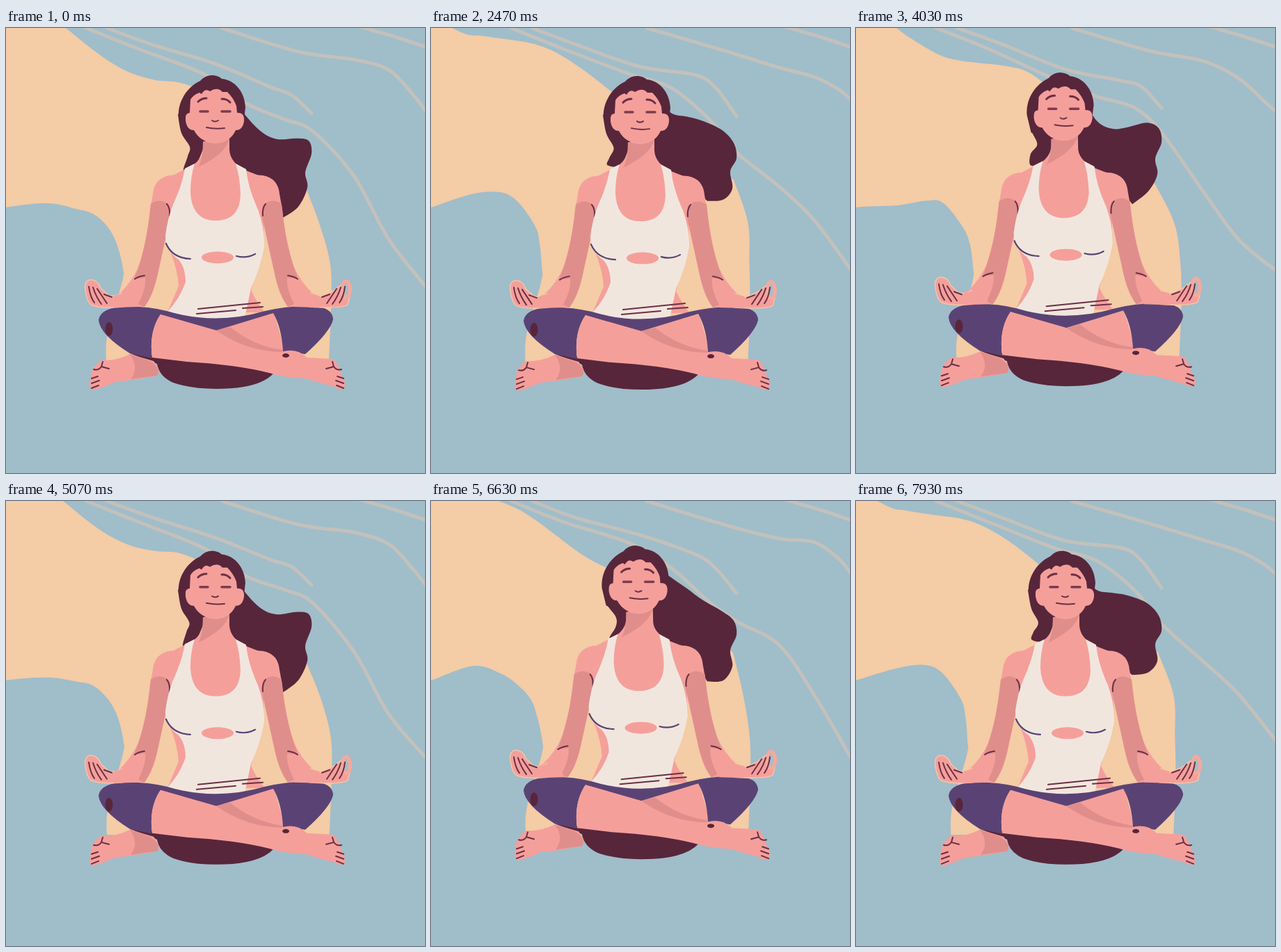
An HTML page for the animation above (8060 ms loop, 602 by 640 pixels).

```html
<!DOCTYPE html>
<html>
<head>
<meta charset="utf-8">
<style>
  html, body { margin: 0; width: 100%; height: 100%; overflow: hidden; background: #a0bdca; }
  svg { display: block; }
  .skin { fill: #f59f9b; }
  .shade { fill: #e08e8c; }
  .hair { fill: #57263b; }
  .cloth { fill: #f1e6de; }
  .shorts { fill: #5a4374; }
  .sand { fill: #f4cca5; }
  .wind { fill: none; stroke: #c3c1bb; stroke-width: 5; stroke-linecap: round; }
  .ink { fill: none; stroke: #6b3045; stroke-width: 2; stroke-linecap: round; }
  .seam { fill: none; stroke: #5a4374; stroke-width: 2.2; stroke-linecap: round; }
  .glow { stroke: #f2c6a6; stroke-width: 1.5; }
</style>
</head>
<body>
<svg width="602" height="640" viewBox="0 0 602 640">
  <defs>
    <g id="arm">
      <path class="skin" d="M262 204 Q250 213 235 213 Q213 217 211 240 L207 262 Q202 310 190 345 Q181 366 163 383 L150 389 L152 403 L198 402 Q212 388 219 350 L237 268 L262 240Z"/>
      <path class="shade" d="M208 254 Q222 244 235 256 L237 268 L219 350 Q212 384 199 402 L190 398 Q202 375 200 360 L184 362 Q202 320 208 254Z"/>
      <path class="ink" d="M185 362 Q191 358 199 357 M231 254 Q236 260 235 271"/>
    </g>
  </defs>
  <g id="wind"></g>
  <path id="sand" class="sand"/>
  <g id="figure">
    <path id="tail" class="hair"/>
    <path id="lock" class="hair"/>
    <g id="upper">
      <path class="skin" d="M283 155 L283 176 Q280 196 255 205 L236 215 L238 260 L236 322 Q247 350 248 372 L232 410 L372 410 Q360 396 352 378 L371 310 L368 215 L345 206 Q322 195 321 176 L321 155Z"/>
      <path class="shade" d="M283 163 Q305 172 321 160 Q316 182 276 201 Q283 190 283 163Z"/>
      <use href="#arm"/>
      <use href="#arm" transform="matrix(-1 0 0 1 604 0)"/>
      <path class="cloth" d="M257 203 L271 196 Q265 215 265 237 Q267 278 301 278 Q336 278 337 240 Q336 215 330 196 L345 204 Q348 232 362 262 Q372 290 371 315 Q366 345 352 375 L343 418 L300 424 L232 409 Q250 390 258 366 Q258 346 248 334 Q230 322 229 300 Q232 275 240 255 Q253 227 257 203Z"/>
      <ellipse class="skin" cx="304" cy="331" rx="23" ry="8.5"/>
      <path class="seam" d="M230 311 Q239 332 265 333 M331 329 Q345 333 358 326"/>
      <path class="ink" d="M276 405 L365 396 M274 412 L330 407 M340 404 L369 402"/>
      <path class="hair" d="M248 130 C246 107 260 86 279 77 Q287 68 298 69 Q306 70 310 74 C330 76 343 94 344 115 L342 132 L325 155 L276 166 L254 155Z"/>
      <path class="skin" d="M264 123 L265 104 Q269 97 278 94 L281 96 Q286 87 293 92 Q304 85 311 93 L318 93 Q327 102 331 113 L332 123 Q343 122 342 135 Q340 148 330 148 Q322 166 300 167 Q279 165 270 148 Q260 148 258 134 Q257 123 264 123Z"/>
      <path class="ink" style="stroke-width:3" d="M276 107 Q281 102 288 102 M310 103 Q318 103 322 108"/>
      <path class="ink" style="stroke:#7d3c4e;stroke-width:3.5" d="M279 121 H290 M310 121 H322"/>
      <path class="ink" d="M288 144 Q301 147 314 145 M296 134 Q300 137 305 134"/>
    </g>
    <path class="hair" d="M178 469 L385 490 V497 Q365 520 302 520 Q265 520 240 511 Q220 502 217 484Z"/>
    <path class="skin" d="M220 412 L302 430 L385 410 L402 470 L300 470Z"/>
    <path class="shorts" d="M133 421 Q135 406 162 402 Q198 400 231 408 Q300 429 372 408 Q405 400 440 401 Q469 402 470 420 Q466 438 430 470 L398 466 Q396 432 384 411 L302 436 L222 413 Q205 438 210 476 L178 469 Q135 442 133 421Z"/>
    <path class="shade" d="M302 436 L322 431 Q355 458 397 464 L400 475 L340 465Z"/>
    <path class="skin" d="M222 413 L302 436 Q345 466 395 467 Q418 460 432 475 L470 477 Q478 484 482 500 Q488 508 487 517 Q480 524 472 517 Q445 510 430 505 Q400 504 378 497 Q330 485 260 481 L210 475 Q205 438 222 413Z"/>
    <path class="skin" d="M178 470 L212 480 Q224 494 217 501 Q180 508 157 510 Q138 519 124 522 Q118 516 122 505 Q120 492 136 479 Q158 480 178 470Z"/>
    <path class="shade" d="M178 470 L207 480 Q224 491 217 501 L179 506 Q192 490 178 470Z"/>
    <g id="toes">
      <path class="ink" d="M126 492 Q133 494 137 488 L148 491 M137 488 L139 481 M123 505 L132 502 M123 512 L134 508 M123 519 L133 515"/>
    </g>
    <use href="#toes" transform="matrix(-1 0 0 1 608 0)"/>
    <ellipse class="hair" cx="148" cy="434" rx="5.5" ry="10"/>
    <ellipse class="hair" cx="402" cy="472" rx="5" ry="3"/>
    <path class="skin glow" d="M166 382 Q155 389 147 385 L136 375 Q132 363 121 363 Q112 365 114 378 Q116 394 122 399 Q135 405 168 402Z"/>
    <path class="skin glow" d="M438 382 Q450 390 458 385 L470 379 L482 370 Q484 384 494 388 L491 399 Q482 405 436 402Z"/>
    <path class="skin" d="M155 386 L186 378 L190 402 L155 403Z M450 386 L418 378 L414 402 L450 403Z"/>
    <ellipse cx="488.500" cy="377" rx="6" ry="12" fill="#a9bdc4" stroke="#f5a99d" stroke-width="5"/>
    <g id="fingers">
      <path class="ink" d="M125 374 Q129 387 137 398 M131 376 L145 397 M119 373 Q121 388 127 396 M141 384 L152 388"/>
    </g>
    <use href="#fingers" transform="matrix(-1 0 0 1 606 0)"/>
  </g>
</svg>
<script>
const LOOP = 8060, STEP = 130, WAVE = 5265, BREATH = 2600;
const [wind, sand, figure, tail, lock, upper] =
  ["wind", "sand", "figure", "tail", "lock", "upper"].map(id => document.getElementById(id));
const clamp = v => Math.max(0, Math.min(1, v));
let phase = 0;

// Vertical wave travelling rightwards; its height grows from x = from over span.
const ripple = (points, x0, k, amp, from = -100, span = 1) => points.map(([x, y]) =>
  [x, y + amp * clamp((x - from) / span) * Math.cos(phase - k * (x - x0))]);

// Sideways wave travelling downwards until it settles into one phase.
const sway = points => points.map(([x, y]) =>
  [x + 5.5 * Math.cos(phase - Math.min(5.5, 3 + 0.027 * (y - 240))), y]);

// Smooth curve through the points, without the leading command.
function curve(p) {
  const at = i => p[Math.max(0, Math.min(p.length - 1, i))];
  let d = "" + p[0];
  for (let i = 0; i < p.length - 1; i++) {
    const [a, b, c, e] = [-1, 0, 1, 2].map(k => at(i + k));
    d += "C" + b.map((v, k) => v + (c[k] - a[k]) / 6) +
      " " + c.map((v, k) => v - (e[k] - b[k]) / 6) + " " + c;
  }
  return d;
}

const lines = [
  { args: [345, 0.027, 18, 200, 230], points: [[115, 0], [190, 30], [285, 67], [345, 97],
    [400, 130], [440, 163], [500, 222], [550, 291], [605, 361]] },
  { args: [375, 0.027, 9, 200, 150], points: [[145, 0], [210, 24], [300, 54], [380, 76], [410, 91], [439, 124]] },
  { args: [400, 0.027, 11, 400, 180], points: [[310, 0], [420, 33], [500, 51], [550, 66], [585, 93], [605, 114]] },
  { args: [0, 0, 0], points: [[508, -2], [560, 13], [605, 28]] }
];
for (const line of lines) {
  line.el = document.createElementNS("http://www.w3.org/2000/svg", "path");
  line.el.setAttribute("class", "wind");
  wind.append(line.el);
}

function drawSand() {
  const top = ripple([[-40, -40], [40, -10], [75, 3], [120, 24], [150, 37], [180, 50],
    [215, 65], [250, 80], [300, 110]], 178, 0.023, 15);
  const right = sway([[430, 218], [453, 280], [462, 340], [463, 400], [460, 480]]);
  const left = sway([[140, 480], [142, 440], [163, 365], [164, 345], [158, 310], [148, 285]]);
  const under = ripple([[125, 258], [100, 248], [60, 246], [0, 258], [-40, 270]], 98, 0.025, 12, 0, 70);
  return "M" + curve(top) + "L" + curve(right) + "L" + curve([...left, ...under]) + "Z";
}

function drawTail() {
  const edge = ripple([[325, 100], [345, 126], [368, 140], [390, 147], [418, 152], [435, 163],
    [439, 183], [430, 206], [433, 229], [420, 251], [397, 261]], 388, 0.033, 14, 325, 25);
  return "M" + curve(edge) + "L375 230 320 200 318 150Z";
}

function drawLock() {
  const swing = amp => amp * Math.cos(phase - 1.2);
  const edge = [[247, 125], [252, 152], [263 + swing(3), 172], [258 + swing(8), 186],
    [254 + swing(3), 202 + 5 * Math.cos(phase)], [273, 197], [286, 168]];
  return "M" + curve(edge) + "L280 110Z";
}

function draw(now) {
  const t = Math.floor(now % LOOP / STEP) * STEP;
  const breath = Math.cos(2 * Math.PI * t / BREATH);
  const depth = 4 * clamp((t - 2000) / 1600);
  phase = 2 * Math.PI * t / WAVE;
  for (const { el, points, args } of lines) el.setAttribute("d", "M" + curve(ripple(points, ...args)));
  sand.setAttribute("d", drawSand());
  tail.setAttribute("d", drawTail());
  lock.setAttribute("d", drawLock());
  figure.setAttribute("transform", `translate(0 ${depth * breath - 1})`);
  upper.setAttribute("transform", `translate(${1.25 * (breath - 1)} 0)`);
}

const start = performance.now();
function tick() {
  draw(performance.now() - start);
  requestAnimationFrame(tick);
}
tick();
</script>
</body>
</html>
```
